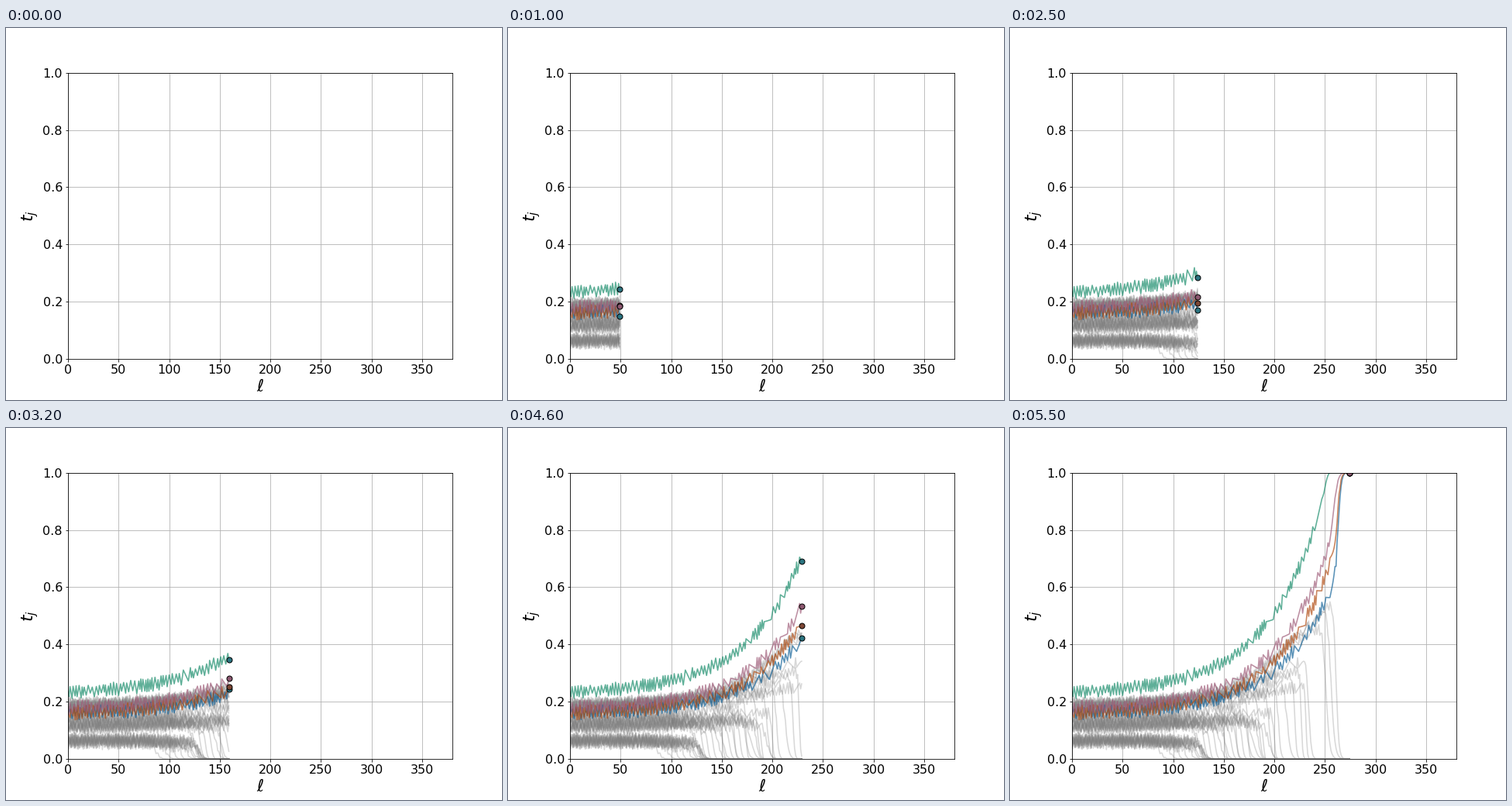
A matplotlib script for the animation above (8600 ms loop, 640 px wide and 480 px high).

```python
import numpy as np
import matplotlib.pyplot as plt
from matplotlib.animation import FuncAnimation

DPI = 72
STEP = 5          # samples revealed per frame
GROW_FRAMES = 55  # the rest of the loop holds the finished curves
FRAMES = 86
N = STEP * GROW_FRAMES
ell = np.arange(N)
growth = np.exp((ell - 189) / 54)
rng = np.random.default_rng(12)


def step_up(center, width):
    return 1 / (1 + np.exp(-np.clip((ell - center) / width, -50, 50)))


def zigzag():
    """Irregular teeth in [-1, 1]; some become long ramps later on."""
    xs, ys = [0], [0.0]
    sign = rng.choice([-1, 1])
    while xs[-1] < N:
        ramp = xs[-1] > 105 and rng.random() < 0.15
        xs.append(xs[-1] + (rng.integers(4, 8) if ramp else rng.integers(1, 3)))
        ys.append(sign * rng.uniform(0.35, 1))
        sign = -sign
    return np.interp(ell, xs, ys)


def winner(base, gain, rise, width):
    """Exponential growth that finally saturates at 1."""
    mean = np.minimum(base + gain * growth, 1)
    mean += (1 - mean) * step_up(rise, width)
    fade = np.clip((1 - mean) * 4, 0, 1)
    return np.clip(mean + 0.026 * fade * zigzag(), 0, 1)


def loser(base, gain, death):
    """Slower growth that sags and then drops to zero."""
    sag = 1 - 0.2 * np.clip((ell - death + 40) / 40, 0, 1)
    value = (base + gain * growth) * sag + 0.022 * zigzag()
    return np.clip(value, 0, 1) * step_up(death, -rng.uniform(0.5, 2.3))


# count, base range, gain range, death range, crowding towards late deaths
groups = [
    (13, (0.053, 0.073), (0.00, 0.01), (87, 130), 3),
    (15, (0.100, 0.150), (0.03, 0.08), (125, 200), 1),
    (11, (0.140, 0.205), (0.07, 0.13), (150, 234), 1.5),
    (3, (0.165, 0.185), (0.13, 0.15), (251, 261), 1),
]

# base, gain, position and width of the final rise, line colour, dot colour
winners = [
    (0.230, 0.227, 252.0, 2.0, "#148a68", "#2b7480"),
    (0.157, 0.125, 263.5, 1.4, "#0d5f96", "#2b7480"),
    (0.157, 0.153, 263.0, 1.6, "#b04a10", "#7c4634"),
    (0.175, 0.170, 260.0, 2.0, "#9e5b78", "#8c5870"),
]

fig, ax = plt.subplots(figsize=(640 / DPI, 480 / DPI), dpi=DPI)
ax.set_xlim(0, 380)
ax.set_ylim(0, 1)
ax.set_xticks(range(0, 351, 50))
ax.grid(True)
ax.set_axisbelow(True)
ax.tick_params(labelsize=16)
ax.set_xlabel(r"$\ell$", fontsize=22)
ax.set_ylabel(r"$t_j$", fontsize=22)

curves, dots = [], []


def add_curve(data, color, alpha):
    line, = ax.plot([], [], color=color, alpha=alpha, lw=1.6)
    curves.append((line, data))


for count, base, gain, (first, last), crowd in groups:
    for u in np.linspace(0, 1, count):
        death = last - (last - first) * u ** crowd
        add_curve(loser(rng.uniform(*base), rng.uniform(*gain), death), "gray", 0.3)

for *shape, color, face in winners:
    data = winner(*shape)
    add_curve(data, color, 0.68)
    dot, = ax.plot([], [], "o", ms=7, mfc=face, mec="black", mew=1, zorder=2.2)
    dots.append((dot, data))


def update(frame):
    n = STEP * min(frame, GROW_FRAMES)
    for line, data in curves:
        line.set_data(ell[:n], data[:n])
    for dot, data in dots:
        dot.set_data(ell[:n][-1:], data[:n][-1:])
    return [artist for artist, _ in curves + dots]


anim = FuncAnimation(fig, update, frames=FRAMES, interval=100, repeat=True, repeat_delay=0)
plt.show()
```
